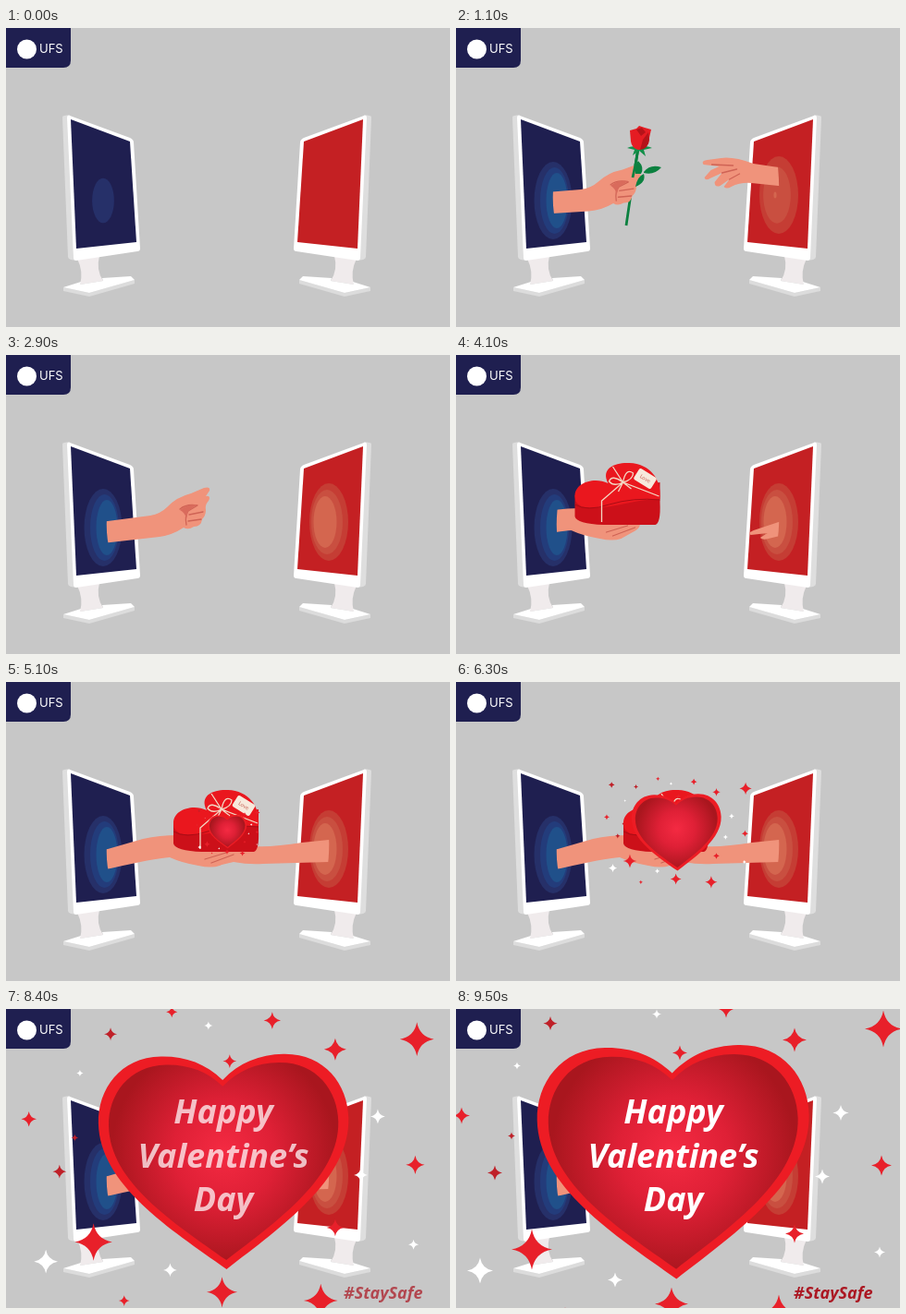
An HTML page for the animation above (9600 ms loop, 480 px wide and 324 px high).

```html
<!DOCTYPE html>
<html lang="en">
<head>
<meta charset="utf-8">
<title>Happy Valentine's Day</title>
<style>
  html, body { margin: 0; width: 100%; height: 100%; overflow: hidden; background: #c7c7c7; }
  svg { display: block; width: 100%; height: 100%; }
  .greeting { font: italic bold 36px "Open Sans", "Noto Sans", sans-serif; fill: #fff; text-anchor: middle; }
  .tag { font: italic bold 18px "Open Sans", "Noto Sans", sans-serif; fill: #ab1722; }
  .brand { font: 13px Inter, Roboto, sans-serif; fill: #fff; }
  .skin { fill: #f0937b; }
  .crease { fill: none; stroke: #cf6355; stroke-width: 1.3; stroke-linecap: round; stroke-linejoin: round; }
</style>
</head>
<body>
<svg viewBox="0 0 480 324" xmlns="http://www.w3.org/2000/svg">
  <defs>
    <clipPath id="leftExit"><path id="leftEdge" d="M112 0V150Q105 190 113 214V324H500V0Z"/></clipPath>
    <clipPath id="rightExit"><path d="M348 0V150Q351 182 347 204V324H0V0Z"/></clipPath>
    <radialGradient id="glow" gradientUnits="userSpaceOnUse" cx="0" cy="-4" r="72">
      <stop offset="0" stop-color="#f42a42"/>
      <stop offset=".45" stop-color="#df2036"/>
      <stop offset="1" stop-color="#a9161e"/>
    </radialGradient>
    <path id="heartShape" d="M0-46C-10-56-22-60.5-36-60.5C-60-60.5-73.5-42-73.5-22C-73.5 14-33 41 0 65.5C33 41 73.5 14 73.5-22C73.5-42 60-60.5 36-60.5C22-60.5 10-56 0-46Z"/>
    <g id="monitor">
      <path fill="#dedede" d="M61 97Q61 95 63 95L69 94L76 252L70 251Q67 250 67 248Z"/>
      <path fill="#f0ebec" d="M77 250L101 247Q97 262 105 274L80 278Q84 264 77 250Z"/>
      <path fill="#dcdcdc" d="M62 281L90 287L139 273V277L90 291L62 285Z"/>
      <path fill="#fff" d="M62 281L81 275L80 278L105 274L104 271L135 269L139 273L90 287Z"/>
      <path fill="#fff" d="M69 95L134 119Q138 121 138 124L145 239Q145 242 142 242L76 252Q73 252 73 249L66 97Q66 94 69 95Z"/>
    </g>
    <path id="screen" d="M70 99L134 123L141 232L76 239Z"/>
  </defs>

  <rect width="480" height="324" fill="#c7c7c7"/>
  <use href="#monitor"/>
  <use href="#screen" fill="#1f1f50"/>
  <g id="leftRipples"></g>
  <g transform="matrix(-1 0 0 1 456 0)">
    <use href="#monitor"/>
    <use href="#screen" fill="#c42023"/>
  </g>
  <g id="rightRipples"></g>

  <g clip-path="url(#leftExit)"><g clip-path="url(#rightExit)">
    <path id="stem" d="M197 130Q191 165 184 214" fill="none" stroke="#0c8140" stroke-width="2.8"/>
    <g id="giver">
      <path class="skin" d="M-20 190L110 180L156 174Q167 172 174 165Q184 154 200 150L214 144Q221 142 220 147L216 153Q222 152 219 158Q215 162 216 168Q216 174 212 178Q211 186 203 186Q197 190 192 187Q180 195 166 197L113 203L-20 218Z"/>
      <path class="crease" d="M188 167Q195 161 207 163L197 169Q193 174 195 184M198 173L213 170M197 180L211 178"/>
      <path fill="#d96b5c" d="M188 168Q196 161 207 162L197 169L195 178Q194 171 188 168Z"/>
    </g>
    <g id="bloom">
      <path d="M197 130Q195 146 191 162" fill="none" stroke="#0c8140" stroke-width="2.8"/>
      <path fill="#0c8140" d="M194 158Q193 148 197 144Q204 151 200 158ZM203 156Q210 147 222 151Q214 160 203 157ZM194 172Q196 161 203 158Q206 167 194 172Z"/>
      <path fill="#14904a" d="M185 130Q193 126 198 131Q205 126 212 130L203 132L205 139L198 133L191 138L193 132Z"/>
      <path fill="#e51c23" d="M188 111L195 109L198 106L204 108L211 110Q209 118 208 125Q204 132 197 132Q190 130 189 123Z"/>
      <path fill="#b51319" d="M195 110L201 108L205 113L200 117ZM208 113L202 121L199 132Q208 131 209 121Z"/>
    </g>
  </g></g>

  <g clip-path="url(#rightExit)">
    <g id="taker">
      <path class="skin" d="M480 160L349 151L322 147Q300 139 287 141L272 143Q265 144 268 148L285 150L276 154L269 162Q270 166 275 163L288 157L280 167Q280 173 286 171L296 164L290 172Q293 175 298 172Q308 167 320 168L349 171L480 184Z"/>
      <path class="crease" d="M277 148L300 149M288 157L304 153M296 164L307 158"/>
    </g>
    <g id="receiver">
      <path class="skin" d="M520 162L349 171L320 174Q290 179 268 178L240 181L213 190Q206 193 210 195L228 193L220 198Q223 201 229 199L246 195Q262 198 278 197L349 195L520 190Z"/>
    </g>
  </g>
  <g clip-path="url(#leftExit)">
    <g id="presenter">
      <path class="skin" d="M-80 210L110 181L148 170Q166 166 186 166L200 180L248 180Q255 184 247 190L231 199Q222 202 208 199Q190 196 177 190Q160 191 113 202L-80 235Z"/>
      <path class="crease" d="M215 192L238 185M222 196L246 187"/>
      <path fill="#cc1019" d="M181 152V175Q183 183 212 184H268Q274 182 273 160V138Z"/>
      <path fill="#ea171e" d="M181 153C181 138 202 132 217 139C208 122 226 116 240 117C262 118 275 134 273 156C243 156 222 168 192 165Q181 163 181 153Z"/>
      <path d="M181 162Q194 170 218 162Q245 154 273 157" fill="none" stroke="#a90d15" stroke-width="1"/>
      <path d="M210 181V158L233 138L272 153M233 138L222 121M233 138Q221 129 218 137Q223 143 233 138Q236 122 244 128Q244 135 233 138L228 148M233 138L242 145" fill="none" stroke="#f3d9c4" stroke-width="1.3"/>
      <g transform="translate(257 134) rotate(32)">
        <rect x="-11" y="-7" width="22" height="14" rx="2" fill="#f7e9dc"/>
        <text y="2" text-anchor="middle" font-family="Lato, sans-serif" font-size="6" fill="#c8695c">Love</text>
      </g>
    </g>
  </g>

  <g id="burst">
    <g transform="translate(-2.2 0) rotate(-1.2)">
      <use href="#heartShape" fill="#ed1c24"/>
      <use href="#heartShape" fill="url(#glow)" transform="scale(.918)"/>
    </g>
    <g id="stars"></g>
  </g>

  <g id="message">
    <text class="greeting" x="235" y="124">Happy</text>
    <text class="greeting" x="235" y="171.5">Valentine’s</text>
    <text class="greeting" x="235" y="219">Day</text>
    <text class="tag" x="365" y="314">#StaySafe</text>
  </g>

  <path fill="#1f1f50" d="M0 0H70V35Q70 43 62 43H0Z"/>
  <circle cx="22.5" cy="23" r="10.5" fill="#fff"/>
  <text class="brand" x="36" y="26.5">UFS</text>
</svg>
<script>
const LOOP = 9600, STEP = 100;
const $ = id => document.getElementById(id);

function add(parent, tag, attrs) {
  const el = document.createElementNS("http://www.w3.org/2000/svg", tag);
  for (const key in attrs) el.setAttribute(key, attrs[key]);
  return parent.appendChild(el);
}

// Linear interpolation through [time, value] keys.
function track(t, keys) {
  if (t <= keys[0][0]) return keys[0][1];
  for (let i = 1; i < keys.length; i++) {
    const [t0, v0] = keys[i - 1], [t1, v1] = keys[i];
    if (t <= t1) return v0 + (v1 - v0) * (t - t0) / (t1 - t0);
  }
  return keys[keys.length - 1][1];
}

const move = (id, x, y = 0, turn = "") => $(id).setAttribute("transform", `translate(${x} ${y}) ${turn}`);
const show = (id, on) => $(id).setAttribute("visibility", on ? "visible" : "hidden");

// Rings: cx, cy, rx, ry, colour, from outside in.
const makeRings = (id, rings) => rings.map(([cx, cy, rx, ry, fill]) =>
  ({ el: add($(id), "ellipse", { cx, cy, fill }), rx, ry }));
const leftRings = makeRings("leftRipples", [
  [105, 187, 20.5, 42, "#263069"], [106.5, 187, 15.5, 36, "#233c7b"], [109, 187, 11.5, 30, "#20508a"]]);
const rightRings = makeRings("rightRipples", [
  [349, 181, 21, 42, "#c53d34"], [347, 181, 17, 35, "#c94f40"], [345, 181, 12.5, 28, "#d4664f"]]);

function ripple(rings, t, start, stagger, from) {
  rings.forEach(({ el, rx, ry }, i) => {
    const begin = start + i * stagger;
    const k = track(t, [[begin, i ? 0 : from], [begin + 400, 1]]);
    el.setAttribute("rx", rx * k);
    el.setAttribute("ry", ry * k);
  });
}

function makeStars(fill, list) {
  for (const [x, y, r] of list)
    add($("stars"), "path", {
      d: "M0-1Q.15-.15 1 0Q.15 .15 0 1Q-.15 .15-1 0Q-.15-.15 0-1Z",
      fill, transform: `translate(${x} ${y}) scale(${r})`
    });
}
makeStars("#e8202a", [
  [111, -70, 10], [63, -64, 6.5], [26, -81, 5], [1, -57, 4], [-33, -86, 3.3],
  [-117, -23, 4.5], [-79, 49.5, 11], [-61, 84, 3.2], [-3.5, 79, 9], [54.5, 84, 10],
  [63, 41, 5], [110, 4, 5.5]]);
makeStars("#bf2028", [[-69, -73, 3.8], [-99, 8, 4], [-109, -76, 5], [-90, -12, 2]]);
makeStars("#fff", [
  [-107, 61, 7], [-34, 66, 4], [88, -24.5, 4.3], [109, 51, 3], [-11.5, -78, 2.5],
  [-87, -50, 2], [78, 10, 4]]);

const GRAB = 1400;
const takerX = t => track(t, [[800, 85], [1260, -46], [1600, -46], [2400, 140]]);

function draw(t) {
  ripple(leftRings, t, 0, 200, .58);
  ripple(rightRings, t, 450, 300, 0);

  const giverX = track(t, [[300, -145], [1100, -22], [1300, 0], [2900, 0], [3200, -125]]);
  const tilt = track(t, [[1100, 3], [1300, 0]]);
  move("giver", giverX, 0, `rotate(${tilt} 135 190)`);
  show("giver", t < 3200);
  move("leftEdge", track(t, [[1100, -4], [1300, 0]]));

  move("taker", takerX(t));
  show("taker", t < 2400);
  const roseX = 22 + (t < GRAB ? giverX : takerX(t) - takerX(GRAB));
  for (const part of ["stem", "bloom"]) {
    move(part, roseX, track(t, [[1100, 0], [1300, -4]]));
    show(part, t > 300 && t < 2400);
  }

  move("presenter", track(t, [[3400, -175], [4400, 0]]));
  show("presenter", t >= 3500);
  move("receiver", track(t, [[3900, 145], [4700, 0]]));
  show("receiver", t >= 3900);

  const size = track(t, [[4700, 0], [5100, .286], [7400, 1], [8400, 1.84], [8900, 1.96], [9500, 2]]);
  $("burst").setAttribute("transform", `translate(240 161.5) scale(${size})`);
  show("burst", size > 0);

  $("message").setAttribute("opacity", track(t, [[7900, 0], [8400, .72], [8600, 1]]));
}

const origin = performance.now();
function tick() {
  const elapsed = (performance.now() - origin) % LOOP;
  draw(Math.floor(elapsed / STEP) * STEP);
  requestAnimationFrame(tick);
}
tick();
</script>
</body>
</html>
```
